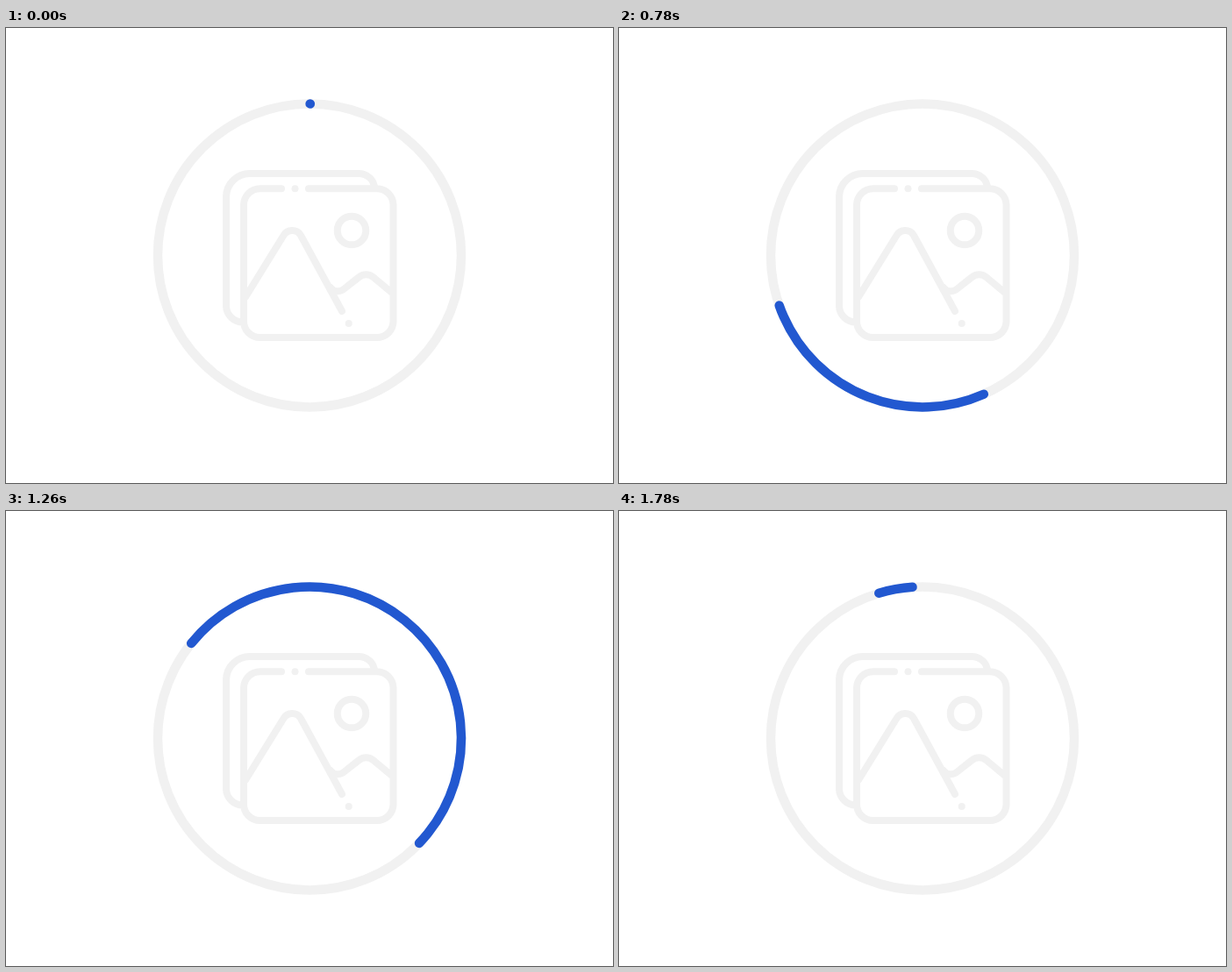
Write an HTML page with a canvas that moves like this. It is 692 by 519 pixels and loops after 1800 ms.

```html
<!DOCTYPE html>
<html lang="en">
<head>
<meta charset="utf-8">
<title>Image loader</title>
<style>
  html, body { margin: 0; width: 100%; height: 100%; overflow: hidden; background: #fff; }
  canvas { display: block; }
</style>
</head>
<body>
<canvas id="stage" width="692" height="519"></canvas>
<script>
const ctx = document.getElementById('stage').getContext('2d');
const LOOP = 1800, TAU = Math.PI * 2;
const CX = 346, CY = 259.4, R = 173;
const GRAY = '#f1f1f1', BLUE = '#2258d0';

// Timing curve like CSS cubic-bezier, solved by bisection
function bezier(x1, y1, x2, y2) {
  const at = (p, a, b) => 3 * (1 - p) * (1 - p) * p * a + 3 * (1 - p) * p * p * b + p * p * p;
  return u => {
    if (u <= 0) return 0;
    if (u >= 1) return 1;
    let lo = 0, hi = 1;
    for (let i = 0; i < 30; i++) {
      const mid = (lo + hi) / 2;
      if (at(mid, x1, x2) < u) lo = mid; else hi = mid;
    }
    return at(lo, y1, y2);
  };
}

const headEase = bezier(0.52, 0.17, 0.9, 0.41);
const tailEase = bezier(0.45, 0, 0.99, 1);
const HEAD_END = 1400, TAIL_START = 976;

const outline = new Path2D(
  // back card
  'M420 182A18 17 0 0 0 402 166H278A27 27 0 0 0 251 193V317A19 19 0 0 0 271 335.5' +
  // front card
  'M314 183.3H289.5A18.5 18.5 0 0 0 271 201.8V334.5A18.5 18.5 0 0 0 289.5 353' +
  'H423A18.5 18.5 0 0 0 441.5 334.5V201.8A18.5 18.5 0 0 0 423 183.3H345' +
  // mountains
  'M273 307L316.5 236.5C320.5 229.5 331.5 229 336 236.5L383 323' +
  'M370 296C374 301.5 380.5 301.5 385.5 297.5L402 284.5C407 280 414 280 419 284.5L440 302'
);

function ring(x, y, r, width) {
  ctx.lineWidth = width;
  ctx.beginPath();
  ctx.arc(x, y, r, 0, TAU);
  ctx.stroke();
}

function dot(x, y, r) {
  ctx.beginPath();
  ctx.arc(x, y, r, 0, TAU);
  ctx.fill();
}

function drawIcon() {
  ctx.strokeStyle = ctx.fillStyle = GRAY;
  ctx.lineWidth = 8;
  ctx.stroke(outline);
  ring(394, 231, 16.3, 8);
  dot(329.5, 183.3, 4);
  dot(390.7, 337, 4);
}

function draw(t) {
  ctx.fillStyle = '#fff';
  ctx.fillRect(0, 0, 692, 519);
  ctx.lineCap = ctx.lineJoin = 'round';
  drawIcon();
  ring(CX, CY, R, 10.5);

  const spin = t / LOOP - 0.25;
  const tail = spin + tailEase((t - TAIL_START) / (LOOP - TAIL_START));
  const head = spin + headEase(t / HEAD_END);
  ctx.strokeStyle = BLUE;
  ctx.lineWidth = 10.5;
  ctx.beginPath();
  ctx.arc(CX, CY, R, tail * TAU, Math.max(head, tail + 0.00005) * TAU);
  ctx.stroke();
}

const start = performance.now();
function tick() {
  draw((performance.now() - start) % LOOP);
  requestAnimationFrame(tick);
}
tick();
</script>
</body>
</html>
```
